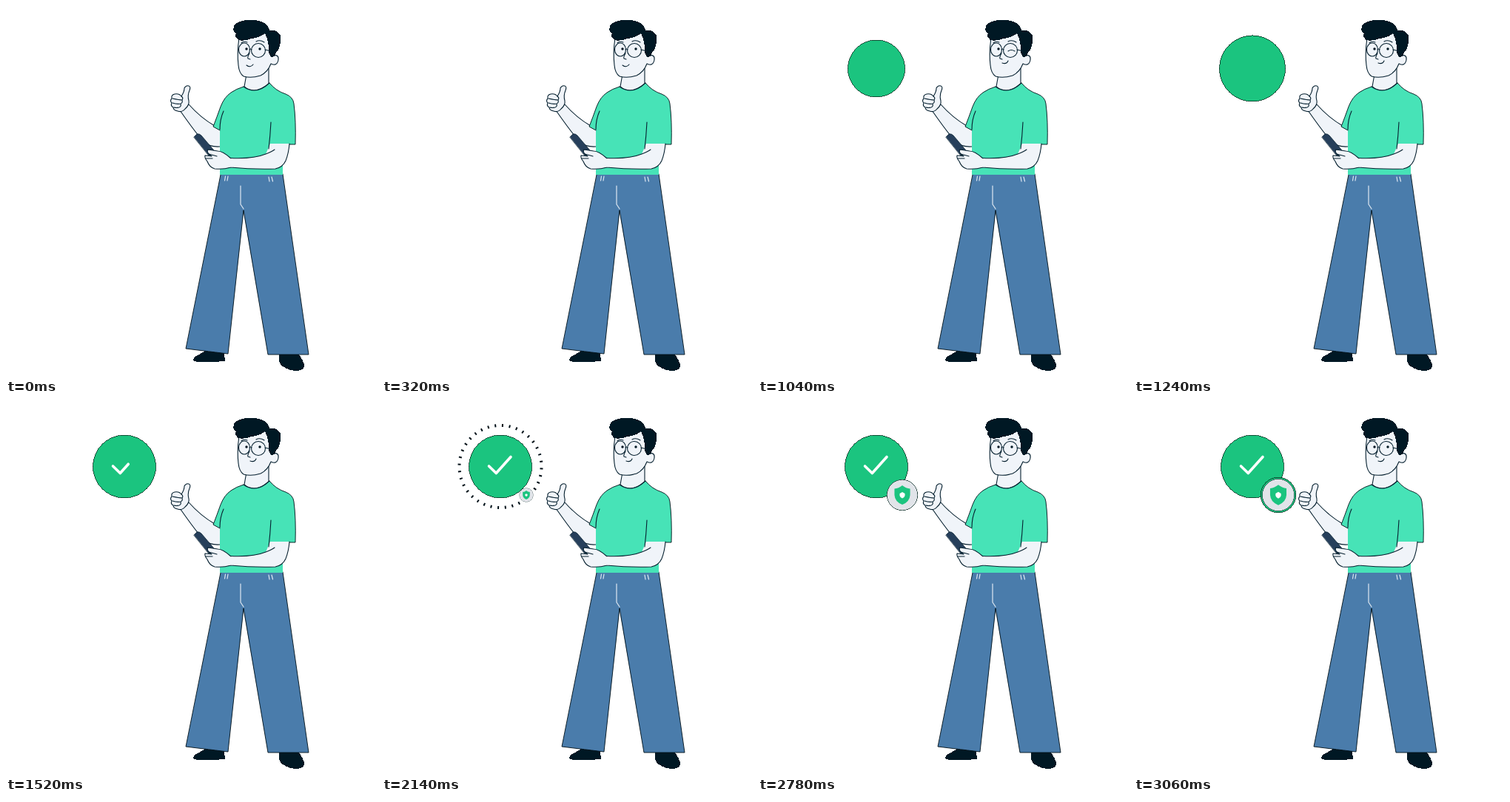
Animation, 500 px wide and 500 px high, one loop 4820 ms. Source, as an HTML page:

```html
<!DOCTYPE html>
<html lang="en">
<head>
<meta charset="utf-8">
<title>Approved</title>
<style>
  html, body { margin: 0; width: 100%; height: 100%; overflow: hidden; background: #fff; }
  svg { display: block; width: 100%; height: 100%; }
  path { stroke-linecap: round; stroke-linejoin: round; }
  .skin { fill: #f0f4f9; stroke: #06202f; stroke-width: 1.1; }
  .ink { fill: #001824; }
  .line { fill: none; stroke: #06202f; stroke-width: 1.1; }
  .seam { fill: none; stroke: #dfe8f2; stroke-width: 1.2; }
  .shirt { fill: #47e3b7; }
  .jeans { fill: #4a7cab; }
  .green { fill: #1bc47f; stroke: #06301f; stroke-width: .8; }
  .edge { fill: none; stroke: #001018; stroke-width: .9; }
  .bare { stroke: none; }
  .edge, .green, .ink, .rim { shape-rendering: crispEdges; }
</style>
</head>
<body>
<svg viewBox="0 0 500 500">
  <!-- legs -->
  <path class="ink" d="M253 479Q253 474 261 471L269 466 295 469 296 480Q284 481 266 481 254 481 253 479Z"/>
  <path class="ink" d="M369 470H395Q403 480 403 487 402 492 393 493 383 493 374 487 367 483 369 470Z"/>
  <path class="jeans" d="M290 228 243 463 300 470 321 278 354 471 409 471 374 227Z"/>
  <path class="edge" d="M290 228 243 463 300 470 321 276 354 471H409L374 227"/>
  <path class="seam" d="M296.500 230 295.500 236M300 230 299 236M355 231 356 237M359 231 360.500 237M317 243V268L321 274"/>

  <!-- raised arm -->
  <path class="skin bare" d="M246 133Q263 151 282 162L290 166V190Q276 191 268 184 260 178 235 141Z"/>
  <path class="line" d="M247 133Q263 151 282 162M289 190Q276 191 268 184 258 174 235 141"/>
  <path class="skin" d="M237 122Q241 116 241 111 243 107 247 108 250 109 248 114 245 121 247 128 248 134 242 139 238 144 232 142 226 141 226 137 222 135 224 131 221 128 224 125 223 120 228 119 234 118 237 122Z"/>
  <path class="line" d="M237 122Q240 124 238 127 234 127 225 125M238 127Q239 131 236 132 231 133 225 131M236 132Q237 136 234 137 230 138 227 137"/>

  <!-- neck and torso -->
  <path class="skin" d="M325 92 322 109Q336 121 355 105V84Z"/>
  <path class="shirt" d="M321 109Q338 121 356 104 365 115 378 119 388 123 389 132 392 155 391 187H374V228H289V168L280 163Q285 150 290 136 295 123 304 117 311 112 321 109Z"/>
  <path class="edge" d="M356 104Q365 115 378 119 388 123 389 132 392 155 391 187H383M289 168 280 163Q285 150 290 136 295 123 304 117 311 112 321 109"/>
  <path class="line" d="M321 109Q338 121 356 104M294 142Q289 153 289 167"/>

  <!-- folded arm, phone -->
  <path class="skin bare" d="M357 186H383Q382 199 378 209 374 218 364 220 335 221 303 218V205.500Q334 207 351 200 356 197 357 186Z"/>
  <path class="skin bare" d="M351 200 363 194 357 186Z"/>
  <path class="line" d="M383 186Q382 199 378 209 374 218 364 220 335 221 303 218M303 205.500Q334 207 351 200 359 197 363 194M358 157Q357 176 355 193"/>
  <path d="M254 177 258 173Q261 172 264 175L287 202H274Z" fill="#263f5b" stroke="#06202f" stroke-width=".7"/>
  <path class="skin" d="M304 206Q293 196 286 196L273 194Q271 196 274 200L278 203 269 202Q268 205 272 210 275 218 282 220 294 221 304 218"/>
  <path class="skin bare" d="M300 206.500H306V217.500H300Z"/>
  <path class="line" d="M274 200 285 203M270 206 279 206"/>

  <!-- head -->
  <path class="skin" d="M315 43Q312 63 314 80 315 91 321 95 331 98 344 94 354 89 358 78 366 82 368 73 369 65 361 67L355 36Z"/>
  <path class="ink" d="M308 35Q305 25 316 21 330 16 345 21 355 25 356 33 366 31 371 40 372 51 368 59 364 63 363 68L358 69 355 63Q356 50 350 37 343 43 331 44 322 48 314 46 308 41 311 37Z"/>
  <path class="line" d="M318 50Q321 47 326 49M338 48Q343 45 349 49M329 64Q326 69 327 71L330 72M350 59 358 61M329 59Q330 57 332 59"/>
  <ellipse class="line" cx="322" cy="59" rx="7.500" ry="9"/>
  <circle class="line" cx="341" cy="60" r="9.500"/>
  <circle cx="325" cy="58" r="1.700" fill="#001824"/>
  <circle id="eye" cx="343" cy="58" r="1.700" fill="#001824"/>
  <path class="line" id="wink" d="M338 61Q342 58 347 61"/>
  <path class="line" id="mouth"/>

  <!-- approval mark -->
  <g transform="translate(160 84.500)">
    <g id="rays" stroke="#001018" stroke-width="2"></g>
    <circle class="green" id="disc"/>
    <path id="check" d="M-15.500-.5-5.700 9 14-13" pathLength="1" stroke-dasharray="1 2" fill="none" stroke="#fff" stroke-width="3.600"/>
  </g>
  <g transform="translate(195 123)">
    <circle class="green" id="ring"/>
    <g id="badge">
      <circle class="rim" r="20.500" fill="#e1e4e9" stroke="#304a48" stroke-width=".7"/>
      <path fill="#1bc47f" d="M0-13Q5-9 10.500-8.500V0Q10 9 0 13-10 9-10.500 0V-8.500Q-5-9 0-13Z"/>
      <path fill="#fff" d="M0-4 3.500-2V1Q3 3 0 4.500-3 3-3.500 1V-2Z"/>
    </g>
  </g>
</svg>
<script>
  const LOOP = 4820, RAYS = 36;
  const el = id => document.getElementById(id);
  const progress = (t, from, to) => Math.min(1, Math.max(0, (t - from) / (to - from)));
  const smooth = p => (1 - Math.cos(Math.PI * p)) / 2;
  const show = (id, on) => el(id).setAttribute('visibility', on ? 'visible' : 'hidden');

  // Scale up past full size, then settle back to 1.
  function pop(t, start, peak, end, size) {
    return size * smooth(progress(t, start, peak)) - (size - 1) * smooth(progress(t, peak, end));
  }

  for (let i = 0; i < RAYS; i++) {
    const ray = document.createElementNS('http://www.w3.org/2000/svg', 'line');
    ray.setAttribute('transform', `rotate(${i * 360 / RAYS + 3})`);
    el('rays').append(ray);
  }

  function draw(t) {
    const winking = t >= 880 && t < 1240;
    show('eye', !winking);
    show('wink', winking);

    const smirk = smooth(progress(t, 840, 960));
    const mix = (a, b) => a + (b - a) * smirk;
    el('mouth').setAttribute('d',
      `M${mix(325, 330)} ${mix(80, 77)}Q${mix(330, 336)} ${mix(84, 79)} ${mix(334, 338)} ${mix(79, 74)}`);

    show('disc', t > 880);
    el('disc').setAttribute('r', 42.5 * pop(t, 880, 1120, 1300, 1.2));

    const drawn = progress(t, 1340, 1600);
    show('check', drawn > 0);
    el('check').setAttribute('stroke-dashoffset', 1 - drawn);

    const burst = progress(t, 1860, 2240);
    const fade = progress(t, 2220, 2400);
    const outer = 45 + 17 * burst;
    show('rays', burst > 0 && fade < 1);
    for (const ray of el('rays').children) {
      ray.setAttribute('y1', -outer);
      ray.setAttribute('y2', -outer + 4 * (1 - fade));
    }

    const grow = smooth(progress(t, 2700, 3040));
    show('badge', t > 2065);
    el('badge').setAttribute('transform', `scale(${pop(t, 2065, 2240, 2360, 1.15) + 0.05 * grow})`);
    show('ring', grow > 0);
    el('ring').setAttribute('r', 20 + 3.8 * grow);
  }

  const begin = performance.now();
  function frame() {
    draw((performance.now() - begin) % LOOP);
    requestAnimationFrame(frame);
  }
  frame();
</script>
</body>
</html>
```
